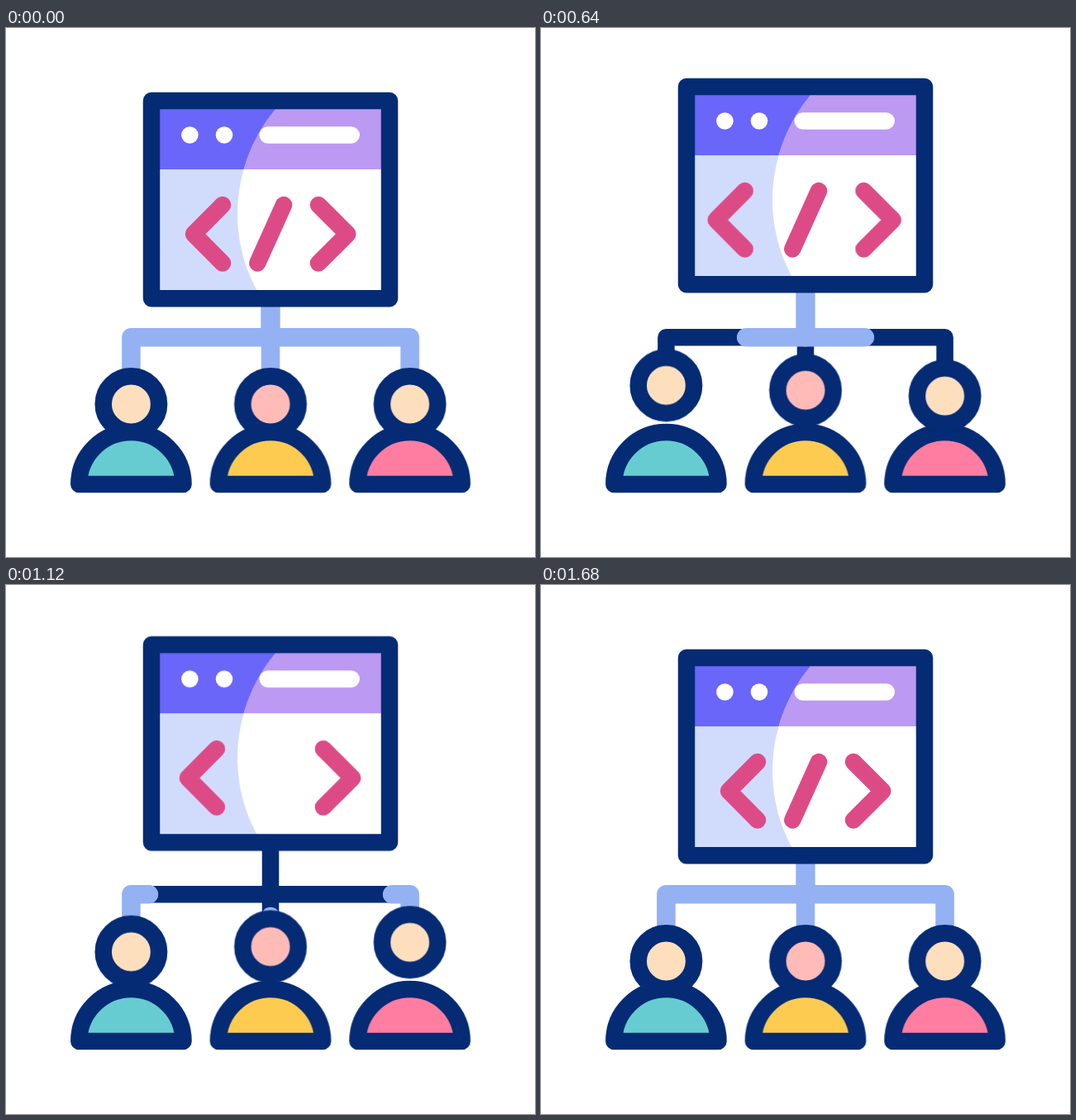
An HTML page without scripts that plays this animation: 640x640 px, repeating every 2 s.

```html
<!DOCTYPE html>
<html lang="en">
<head>
<meta charset="utf-8">
<title>Team code screen</title>
<style>
  html, body { margin: 0; height: 100%; overflow: hidden; background: #fff; }
  svg { display: block; width: 100%; height: 100%; }

  .outline { stroke: #052b75; stroke-width: 20.5; stroke-linejoin: round; }
  .wire { fill: none; }
  .signal { fill: none; stroke: #94b1f4; stroke-width: 22.6; stroke-linecap: round; stroke-linejoin: round;
    stroke-dasharray: 100 200; animation: flow 2s infinite; }
  .code { fill: none; stroke: #dd4b87; stroke-width: 20.5; stroke-linecap: round; stroke-linejoin: round; }

  .screen, .head, .left, .right { animation: 2s cubic-bezier(.333, 0, .667, 1) infinite; }
  .screen { animation-name: lift; }
  .head { animation-name: nod; }
  .second { animation-delay: .08s; }
  .third { animation-delay: .16s; }
  .left { --shift: -16px; animation-name: spread; }
  .right { --shift: 13px; animation-name: spread; }
  .slash { animation: blink 2s step-end infinite; }

  @keyframes lift {
    0%, 12.1% { transform: none; }
    40.2%, 48% { transform: translateY(-21.4px); }
    72%, 100% { transform: none; }
  }
  @keyframes nod {
    0%, 14.8% { transform: none; }
    36.7%, 43% { transform: translateY(-25.6px); }
    67.2%, 100% { transform: none; }
  }
  @keyframes spread {
    0%, 4% { transform: none; }
    36%, 40% { transform: translateX(var(--shift)); }
    70%, 100% { transform: none; }
  }
  @keyframes blink {
    0% { visibility: visible; }
    36% { visibility: hidden; }
    60%, 100% { visibility: visible; }
  }
  /* Drains from the heads into the screen, then refills from the heads. */
  @keyframes flow {
    0%, 4% { stroke-dashoffset: 0; animation-timing-function: cubic-bezier(.33, .13, .67, .6); }
    16% { stroke-dashoffset: -16.3; animation-timing-function: cubic-bezier(.33, .23, .67, .5); }
    32% { stroke-dashoffset: -53.9; animation-timing-function: linear; }
    40% { stroke-dashoffset: -93.1; animation-timing-function: linear; }
    41.5% { stroke-dashoffset: -105; animation-timing-function: step-end; }
    42% { stroke-dashoffset: 97; animation-timing-function: linear; }
    56% { stroke-dashoffset: 70.6; animation-timing-function: linear; }
    64% { stroke-dashoffset: 52.9; animation-timing-function: cubic-bezier(.33, .27, .6, 1); }
    83%, 100% { stroke-dashoffset: 0; }
  }
</style>
</head>
<body>
<svg viewBox="0 0 640 640">
  <defs>
    <clipPath id="glass"><rect x="176" y="88" width="288" height="239"/></clipPath>
    <path id="body" class="outline" d="M88.3 552a63.1 63 0 0 1 126.2 0z"/>
    <circle id="face" class="outline" cx="151.4" cy="455" r="33.7"/>
  </defs>

  <path class="outline wire" d="M151.4 443V374.3H488.6V443M320 300V443"/>
  <path class="signal" pathLength="100" d="M320 443V301"/>
  <path class="signal" pathLength="100" d="M151.4 443V374.3H320V306"/>
  <path class="signal" pathLength="100" d="M488.6 443V374.3H320V306"/>

  <g class="screen">
    <g clip-path="url(#glass)">
      <path fill="#d1dcfd" d="M176 88h288v240H176z"/>
      <path fill="#6a66f9" d="M176 88h288v83H176z"/>
      <circle cx="475" cy="225" r="195" fill="#fff"/>
      <path fill="#bc99f2" d="M464 88V171H287.6A195 195 0 0 1 335 88z"/>
    </g>
    <rect class="outline" x="176" y="88" width="288" height="239.3" fill="none"/>
    <g fill="#fff">
      <circle cx="222.4" cy="129.5" r="10.3"/>
      <circle cx="264" cy="129.5" r="10.3"/>
      <rect x="306.5" y="119.2" width="121.5" height="20.6" rx="10.3"/>
    </g>
    <g class="code">
      <path class="left" d="M262 214l-35 35.2 35 35.2"/>
      <path class="slash" d="M336 214L304.3 284.4"/>
      <path class="right" d="M378 214l35.3 35.2-35.3 35.2"/>
    </g>
  </g>

  <g>
    <use href="#body" fill="#67ccd1"/>
    <g class="head"><use href="#face" fill="#fddfbd"/></g>
  </g>
  <g transform="translate(168.6)">
    <use href="#body" fill="#fdcb50"/>
    <g class="head second"><use href="#face" fill="#febbb8"/></g>
  </g>
  <g transform="translate(337.2)">
    <use href="#body" fill="#ff7da0"/>
    <g class="head third"><use href="#face" fill="#fddfbd"/></g>
  </g>
</svg>
</body>
</html>
```
